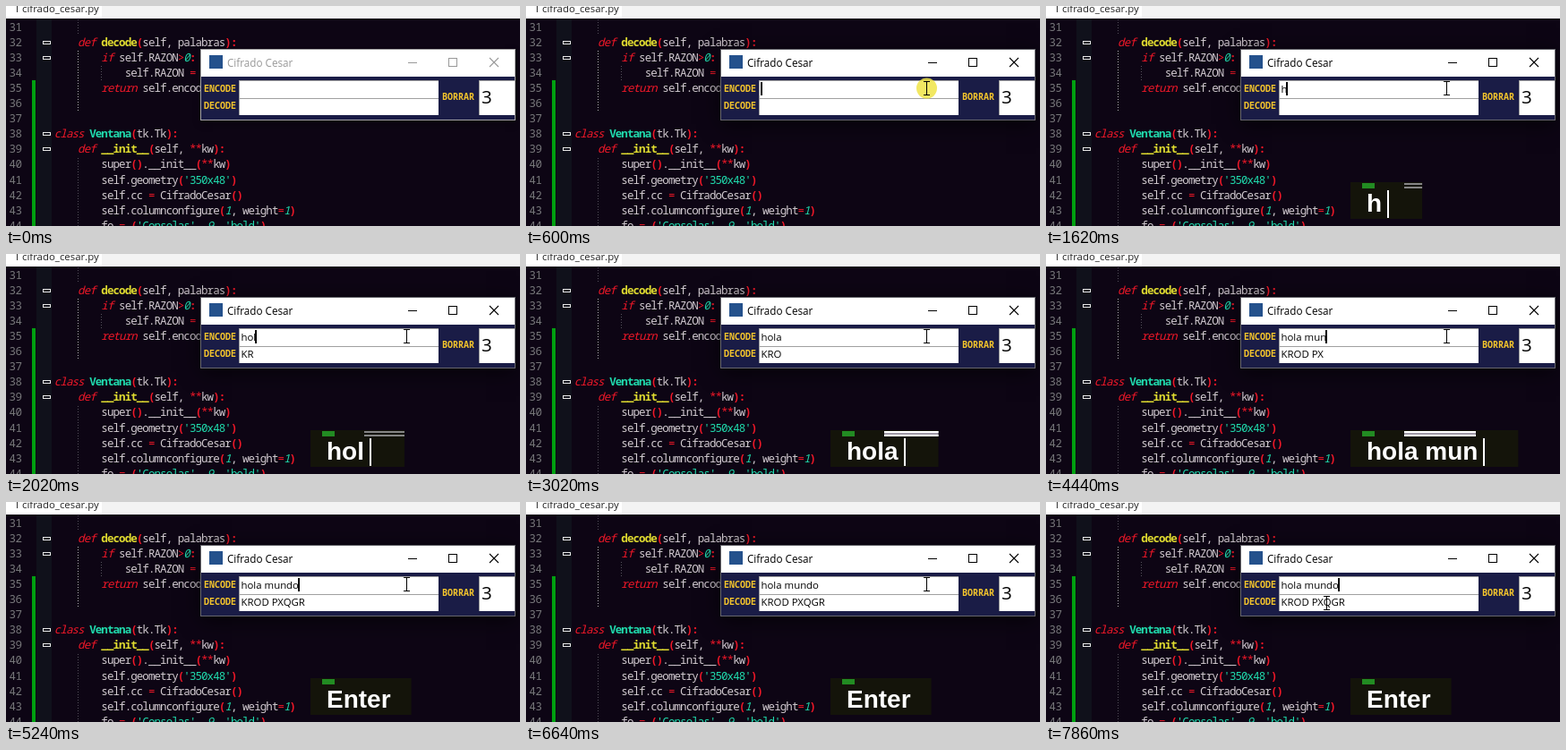
Animation of 574x246 px, one loop 8 s. Source, as an HTML page with a canvas:

```html
<!DOCTYPE html>
<html lang="es">
<head>
<meta charset="utf-8">
<title>Cifrado</title>
<style>
  html, body { margin: 0; height: 100%; overflow: hidden; background: #0d0514; }
  canvas { display: block; }
</style>
</head>
<body>
<canvas id="stage" width="574" height="246"></canvas>
<script>
const ctx = document.getElementById('stage').getContext('2d');
const LOOP = 8000, FIRST_LINE = 31, LINE_HEIGHT = 17.1, CODE_LEFT = 53.8, CHAR = 6.57;
const UI = '"Open Sans", sans-serif', MONO = '"Noto Sans Mono", monospace';
const CODE_FONT = '12.5px ' + MONO;

const code = [
  '',
  '    def decode(self, palabras):',
  '        if self.RAZON>0:',
  '            self.RAZON = -self.RAZON',
  '        return self.encode(palabras)',
  '',
  '',
  'class Ventana(tk.Tk):',
  '    def __init__(self, **kw):',
  '        super().__init__(**kw)',
  "        self.geometry('350x48')",
  '        self.cc = CifradoCesar()',
  '        self.columnconfigure(1, weight=1)',
  "        fo = ('Consolas', 9, 'bold')",
];
const TOKENS = /'|\w+|\s+|[^\w\s]/g;
const RED = '#f01828', TEAL = '#20dcae';

const phrase = 'hola mundo';
const keyTimes = [1620, 1820, 2020, 2420, 3240, 3440, 4240, 4440, 4640, 4840];
const ENTER = 5240, FOCUS = 600;
const caretOff = [[1220, 1620], [3020, 3240], [4040, 4240], [5840, 6040], [6640, 7040]];
const pointerPath = [[200, 468, 110], [400, 456, 99], [600, 447.5, 92], [7460, 449, 92], [7860, 313, 113]];
const clicks = [[600, 820], [7460, 7660]];

const within = (spans, t) => spans.some(([from, to]) => t >= from && t < to);

const cipher = text => text.toUpperCase().replace(/[A-Z]/g,
  c => String.fromCharCode((c.charCodeAt(0) - 62) % 26 + 65));

function rect(x, y, w, h, color) {
  ctx.fillStyle = color;
  ctx.fillRect(x, y, w, h);
}

function sunken(x, y, w, h) {
  rect(x, y, w, h, '#a0a0a0');
  rect(x + 1, y + 1, w - 1, h - 1, '#fff');
}

function text(str, x, y, font, color, spacing = 0) {
  ctx.font = font;
  ctx.letterSpacing = spacing + 'px';
  ctx.fillStyle = color;
  ctx.fillText(str, x, y);
  return ctx.measureText(str).width;
}

function lines(color, width, ...paths) {
  ctx.strokeStyle = color;
  ctx.lineWidth = width;
  ctx.beginPath();
  for (const [x1, y1, x2, y2] of paths) {
    ctx.moveTo(x1, y1);
    ctx.lineTo(x2, y2);
  }
  ctx.stroke();
}

function tokenStyle(token, previous, quoted) {
  if (quoted || token === "'") return ['', TEAL];
  if (/^(def|class|if|return)$/.test(token)) return ['italic ', RED];
  if (previous === 'def') return ['bold ', '#e0dc30'];
  if (previous === 'class') return ['bold ', TEAL];
  if (/^\d+$/.test(token)) return ['italic ', TEAL];
  if (/^[():]$/.test(token)) return ['bold ', RED];
  if (/^[=*>-]$/.test(token)) return ['', RED];
  return ['', '#d2cbd0'];
}

function drawCodeLine(line, baseline) {
  let column = 0, previous = '', quoted = false;
  for (const token of line.match(TOKENS) || []) {
    const [style, color] = tokenStyle(token, previous, quoted);
    text(token, CODE_LEFT + column * CHAR, baseline, style + CODE_FONT, color, -0.93);
    column += token.length;
    if (token === "'") quoted = !quoted;
    if (token.trim()) previous = token;
  }
}

function drawEditor() {
  rect(0, 0, 574, 246, '#0d0514');
  rect(34, 14, 17, 232, '#10111b');
  rect(29, 83, 4, 163, '#00a010');
  ctx.setLineDash([1, 2]);
  lines('#55505c', 1, [80.5, 15, 80.5, 33], [106.5, 67, 106.5, 84], [80.5, 170, 80.5, 246]);
  lines('#b4b0b8', 1, [80.5, 50, 80.5, 118]);
  ctx.setLineDash([]);

  code.forEach((line, i) => {
    const middle = 23 + i * LINE_HEIGHT;
    text(FIRST_LINE + i, 3.5, middle + 4.5, CODE_FONT, '#77777a', -0.4);
    if (/^\s*(def|if|class)/.test(line)) {
      ctx.strokeStyle = '#e8e8e8';
      ctx.lineWidth = 1;
      ctx.strokeRect(41.5, Math.ceil(middle) - 1.5, 8, 3);
    }
    drawCodeLine(line, middle + 4.5);
  });

  rect(0, 0, 574, 14, '#f3f3f3');
  rect(0, 0, 107, 14, '#fff');
  rect(12, 0, 1, 7, '#333');
  text('cifrado_cesar.py', 18, 7, '11.4px ' + UI, '#222');
}

function drawWindow(active) {
  const ink = active ? '#000' : '#999';
  ctx.save();
  ctx.shadowColor = active ? 'rgba(0,0,0,.65)' : 'rgba(0,0,0,.3)';
  ctx.shadowBlur = active ? 22 : 8;
  ctx.shadowOffsetY = 4;
  rect(217, 48, 352, 80, active ? '#66666c' : '#a4a4a4');
  ctx.restore();
  rect(218, 49, 350, 30, '#fff');
  rect(218, 79, 350, 48, '#1a1c46');
  rect(227, 55, 15, 15, '#24518c');
  text('Cifrado Cesar', 247, 67.5, '11.7px ' + UI, ink);
  lines(ink, 1, [449, 63.5, 459, 63.5]);
  ctx.strokeRect(494.5, 58.5, 9, 9);
  lines(ink, 1.1, [540, 58, 550, 68], [550, 58, 540, 68]);

  const labelFont = 'bold 10px ' + MONO;
  text('ENCODE', 221, 96, labelFont, '#f6c62c');
  text('DECODE', 221, 115, labelFont, '#f6c62c');
  text('BORRAR', 487, 105, labelFont, '#f6c62c');
  sunken(260, 83, 223, 20);
  sunken(260, 103, 223, 19);
  sunken(528, 83, 40, 39);
  text('3', 531, 109, '20.5px ' + UI, '#000');
}

function drawEntries(typed, t) {
  const font = '11.4px ' + UI;
  const width = text(typed, 262.5, 97, font, '#000');
  text(cipher(t < ENTER ? typed.slice(0, -1) : typed), 262.5, 116, font, '#000');
  if (t >= FOCUS && !within(caretOff, t)) rect(Math.round(261.5 + width), 85, 2, 15, '#000');
}

function drawKeys(typed, t) {
  if (!typed) return;
  const entered = t >= ENTER, shown = entered ? 'Enter' : typed;
  ctx.font = 'bold 28px "Liberation Sans", Arial, sans-serif';
  ctx.letterSpacing = '0px';
  const width = ctx.measureText(shown).width;
  const box = width + (entered ? 41 : 63);
  rect(340, 197, box, 41, '#14140a');
  rect(353, 198, 14, 6, '#228b22');
  if (!entered) {
    const settled = t >= 2220, color = settled ? '#fff' : '#858585';
    const stripe = Math.min(480, 340 + box) - 400;
    if (settled) rect(400, 198, stripe, 6, '#a09aa8');
    rect(400, 198, stripe, 2, color);
    rect(400, 202, stripe, 2, color);
    rect(Math.round(364 + width), 206, 2, 31, '#fff');
  }
  text(shown, 358, 230, ctx.font, '#fff');
}

function drawPointer(t) {
  const [, x, y] = pointerPath.findLast(step => t >= step[0]) || [];
  if (!x) return;
  if (within(clicks, t)) {
    ctx.fillStyle = 'rgba(240,228,70,.85)';
    ctx.beginPath();
    ctx.arc(x, y, 11.5, 0, 2 * Math.PI);
    ctx.fill();
  }
  const cx = Math.floor(x) + 0.5;
  lines('#000', 1, [cx, y - 7, cx, y + 7],
    [cx - 3.5, y - 7.5, cx + 3.5, y - 7.5], [cx - 3.5, y + 7.5, cx + 3.5, y + 7.5]);
}

function draw(now) {
  const t = now % LOOP;
  const typed = phrase.slice(0, keyTimes.filter(time => time <= t).length);
  drawEditor();
  drawWindow(t >= FOCUS);
  drawEntries(typed, t);
  drawKeys(typed, t);
  drawPointer(t);
}

const start = performance.now();
function tick() {
  draw(performance.now() - start);
  requestAnimationFrame(tick);
}
tick();
</script>
</body>
</html>
```
